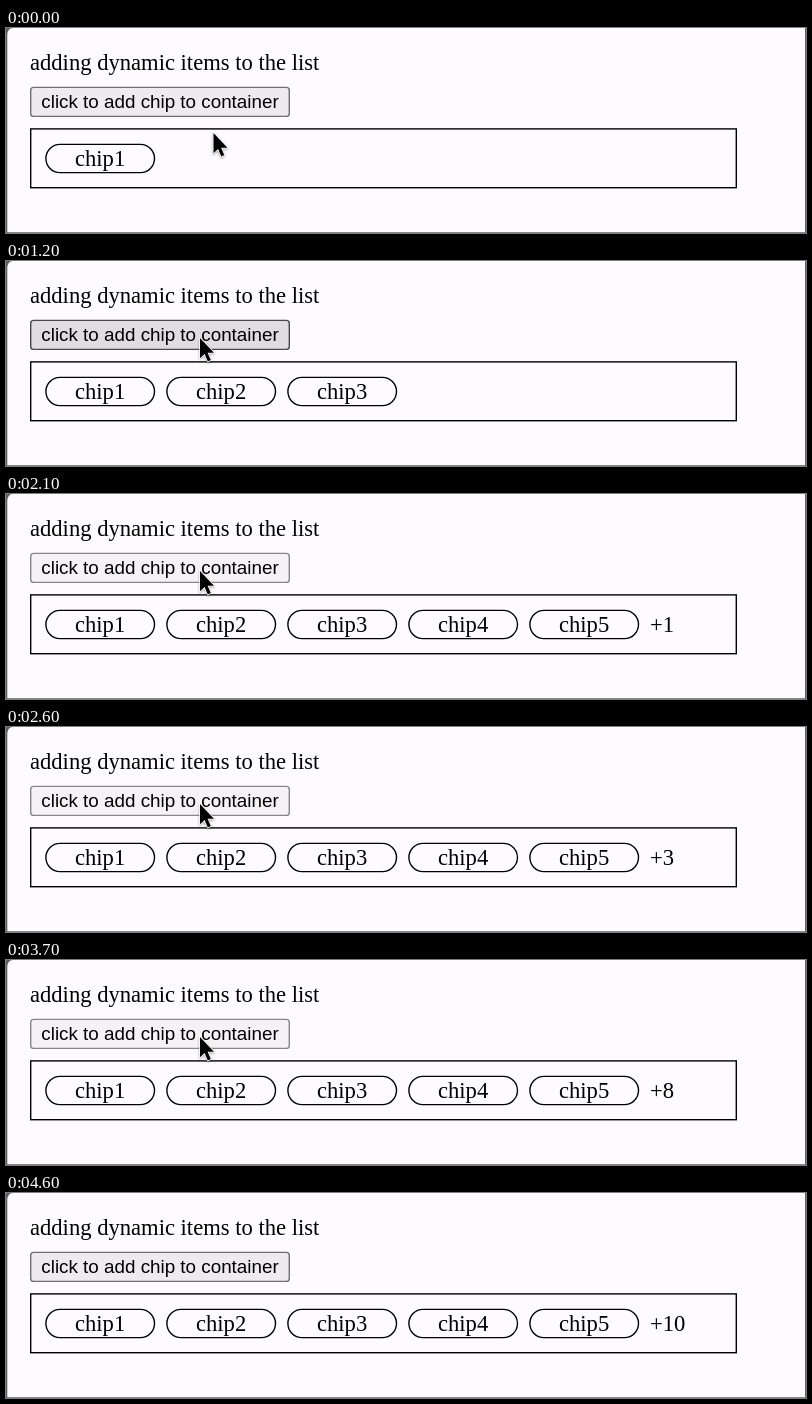
An HTML page for the animation above (5.3 s loop, 800 px wide and 205 px high).

```html
<!DOCTYPE html>
<html lang="en">
<head>
<meta charset="utf-8">
<title>Dynamic chips</title>
<style>
  html, body { margin: 0; width: 100%; height: 100%; overflow: hidden; background: #fdfbff; }
  svg { display: block; width: 800px; height: 205px; }
  .serif { font: 22.6px "Liberation Serif", "Times New Roman", serif; }
  .sans { font: 18.82px "Liberation Sans", Arial, sans-serif; }
  .line { fill: none; stroke: #000; stroke-width: 1.4; }
  #arrow { filter: drop-shadow(0 1.5px 1.2px rgba(0, 0, 0, .35)); }
</style>
</head>
<body>
<svg viewBox="0 0 800 205">
  <rect width="800" height="205" fill="#5f5e61"/>
  <path d="M1.3 205V8Q1.3 0 7 0H799V204.3H1.3Z" fill="#fdfbff"/>
  <text class="serif" x="24" y="42">adding dynamic items to the list</text>
  <rect id="button" x="24.7" y="59.4" width="258.6" height="29" rx="3" stroke-width="1.4"/>
  <text class="sans" x="35.3" y="80">click to add chip to container</text>
  <rect class="line" x="24.7" y="100.9" width="705.6" height="58.8"/>
  <g id="chips"></g>
  <text id="more" class="serif" x="644" y="138"></text>
  <g id="arrow">
    <path d="M0 0V20.2L4.6 16L7.8 23.4L10.8 22.1L7.6 14.8H14Z"
      fill="#000" stroke="#fff" stroke-width="1.6" paint-order="stroke" stroke-linejoin="round"/>
  </g>
</svg>
<script>
const LOOP = 5300, VISIBLE = 5;
const $ = id => document.getElementById(id);

// [fill, border]
const looks = {
  idle: ['#edebef', '#6f6e71'],
  hover: ['#dfdde1', '#49484b'],
  press: ['#f4f2f6', '#87868a']
};

// [start ms, value]
const pointer = [[0, [207.5, 105]], [100, [206, 100]], [200, [202, 91]],
  [300, [197, 81]], [400, [194, 77]], [4500, null]];
const presses = [500, 1000, 1400, 1600, 1800, 2100, 2600, 2800, 3000, 3300, 3500, 3700, 4100];
const adds = [...presses.map(t => t + 100), 2400];
const button = [[0, 'idle'], [300, 'hover'],
  ...presses.flatMap(t => [[t, 'press'], [t + 100, 'hover']]), [4600, 'idle']];

const at = (steps, t) => steps.filter(s => s[0] <= t).pop()[1];

for (let i = 0; i < VISIBLE; i++) {
  const x = 121 * i;
  $('chips').insertAdjacentHTML('beforeend',
    `<g><rect class="line" x="${39.9 + x}" y="116.4" width="108.6" height="28.2" rx="14.1"/>
     <text class="serif" x="${69 + x}" y="138">chip${i + 1}</text></g>`);
}
const chips = [...$('chips').children];

function draw(now) {
  const t = now % LOOP;
  const [fill, border] = looks[at(button, t)];
  $('button').setAttribute('fill', fill);
  $('button').setAttribute('stroke', border);

  const count = 1 + adds.filter(a => a <= t).length;
  chips.forEach((chip, i) => chip.style.display = i < count ? '' : 'none');
  $('more').textContent = count > VISIBLE ? '+' + (count - VISIBLE) : '';

  const spot = at(pointer, t);
  $('arrow').style.display = spot ? '' : 'none';
  if (spot) $('arrow').setAttribute('transform', `translate(${spot})`);
}

const start = performance.now();
function tick() {
  draw(performance.now() - start);
  requestAnimationFrame(tick);
}
tick();
</script>
</body>
</html>
```
